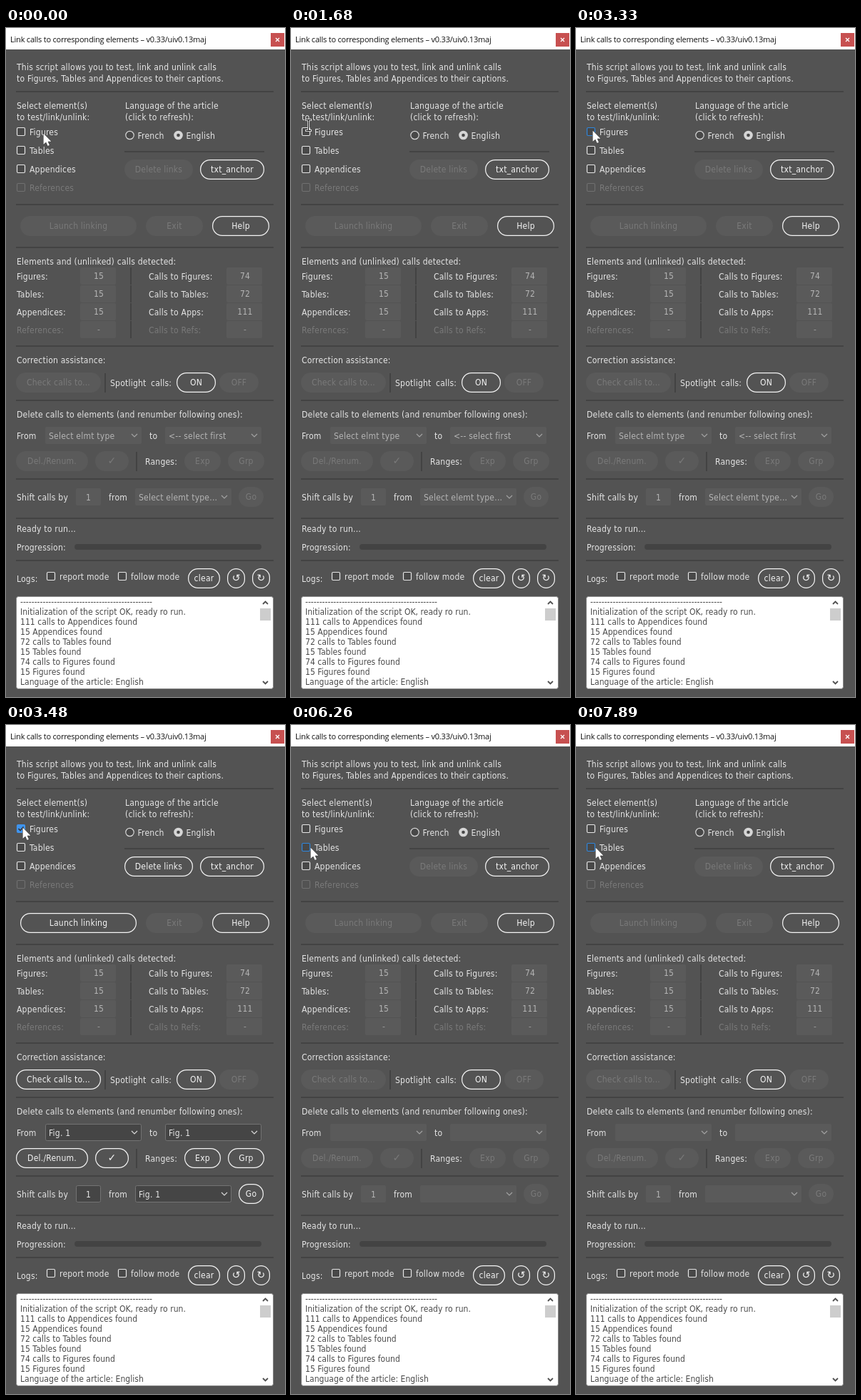
Animation, 391 px wide and 936 px high, one loop 8 s. Source, as an HTML page with a canvas:

```html
<!DOCTYPE html>
<html lang="en">
<head>
<meta charset="utf-8">
<title>Link calls</title>
<style>
html, body { margin: 0; width: 100%; height: 100%; overflow: hidden; background: #535353; }
canvas { display: block; }
</style>
</head>
<body>
<canvas id="stage" width="391" height="936"></canvas>
<script>
const ctx = document.getElementById('stage').getContext('2d');
const LOOP = 8000;
const UI = '12px "DejaVu Sans Condensed", "Noto Sans", sans-serif';
const TITLE = '11px "Open Sans", "Noto Sans", sans-serif';
const SYMBOL = '14px "DejaVu Sans", sans-serif';
const BG = '#535353', INK = '#e6e6e6', DIM = '#7a7a7a', RULE = '#434343';
const PALE = '#5a5a5a', BLUE = '#3f94ee';

// time, x, y, shape
const moves = [
  [0, 52, 147], [560, 51, 147], [1240, 50, 147], [1380, 45, 144],
  [1530, 37, 132, 'beam'], [1680, 20, 127, 'beam'], [3050, 23, 143],
  [5740, 25, 160], [5860, 27, 171]
];

// time, figures box, tables box, dropdown texts, controls enabled
const first = ['Select elmt type', '<-- select first', 'Select elemt type...'];
const blank = ['', '', ''];
const states = [
  [0, '', '', first, false],
  [3050, 'hover', '', first, false],
  [3330, 'focus', '', first, false],
  [3480, 'checked', '', Array(3).fill('Fig. 1'), true],
  [5180, 'focus', '', blank, false],
  [5860, 'focus', 'hover', blank, false],
  [6260, '', 'focus', blank, false],
  [6380, '', 'checked', Array(3).fill('Table 1'), true],
  [7890, '', 'focus', blank, false]
];

const at = (list, t) => list.filter(row => row[0] <= t).pop();

function text(str, x, y, color = INK, align = 'left', font = UI, gap = 0.23) {
  ctx.font = font;
  ctx.letterSpacing = gap + 'px';
  ctx.textAlign = align;
  ctx.fillStyle = color;
  ctx.fillText(str, x, y);
}

function rect(x, y, w, h, color) {
  ctx.fillStyle = color;
  ctx.fillRect(x, y, w, h);
}

function round(x, y, w, h, r, fill, stroke, line = 1) {
  ctx.beginPath();
  ctx.roundRect(x, y, w, h, r);
  if (fill) { ctx.fillStyle = fill; ctx.fill(); }
  if (stroke) { ctx.strokeStyle = stroke; ctx.lineWidth = line; ctx.stroke(); }
}

function path(points, color, width, close) {
  ctx.beginPath();
  points.forEach(([x, y]) => ctx.lineTo(x, y));
  if (close) ctx.closePath();
  ctx.strokeStyle = color;
  ctx.lineWidth = width;
  ctx.stroke();
}

function button(label, x, y, w, on = true, font = UI) {
  if (on) round(x + 0.6, y + 0.6, w - 1.2, 26.8, 13.4, null, '#f4f4f4', 1.2);
  else round(x, y, w, 28, 14, PALE);
  text(label, x + w / 2, y + 18, on ? '#f4f4f4' : DIM, 'center', font);
}

function check(x, y, mode) {
  const stroke = { focus: '#2f86dd', checked: BLUE, off: '#707070', hover: '#ffffff' }[mode] || INK;
  const fill = mode === 'checked' ? BLUE : mode === 'off' ? null : '#484848';
  round(x + 0.5, y + 0.5, 11, 11, 1.5, fill, stroke, 1.2);
  if (mode === 'checked') path([[x + 2.5, y + 6], [x + 5, y + 8.5], [x + 9.5, y + 3.5]], '#303030', 1.6);
}

function option(label, x, y, mode) {
  check(x, y, mode);
  text(label, x + 18, y + 11, mode === 'off' ? DIM : INK);
}

function radio(label, x, y, on) {
  ctx.beginPath();
  ctx.arc(x, y, 5.7, 0, 7);
  ctx.fillStyle = on ? '#d6d6d6' : '#484848';
  ctx.fill();
  ctx.strokeStyle = '#d6d6d6';
  ctx.lineWidth = 1.2;
  ctx.stroke();
  if (on) {
    ctx.beginPath();
    ctx.arc(x, y, 2.3, 0, 7);
    ctx.fillStyle = '#484848';
    ctx.fill();
  }
  text(label, x + 11, y + 5);
}

function field(x, y, w, on) {
  if (on) round(x + 0.5, y + 0.5, w - 1, 23, 2, '#454545', '#737373');
  else round(x, y, w, 24, 2, PALE);
}

function menu(label, x, y, w, on) {
  field(x, y, w, on);
  text(label, x + 5, y + 17, on ? INK : '#b4b4b4');
  const cx = x + w - 10, cy = y + 10;
  path([[cx - 4, cy], [cx, cy + 4], [cx + 4, cy]], on ? '#d8d8d8' : '#a2a2a2', 1.2);
}

function titleBar() {
  rect(0, 0, 391, 30, '#ffffff');
  text('Link calls to corresponding elements – v0.33/uiv0.13maj', 6, 20, '#111111', 'left', TITLE, -0.2);
  rect(371, 7, 19, 19, '#c75050');
  path([[378, 14], [383, 19]], '#ffffff', 1.3);
  path([[383, 14], [378, 19]], '#ffffff', 1.3);
}

function counts() {
  text('Elements and (unlinked) calls detected:', 15, 331);
  const rows = [
    ['Figures:', '15', 'Calls to Figures:', '74'],
    ['Tables:', '15', 'Calls to Tables:', '72'],
    ['Appendices:', '15', 'Calls to Apps:', '111'],
    ['References:', '-', 'Calls to Refs:', '-']
  ];
  rows.forEach(([a, n, b, m], i) => {
    const y = 335 + i * 25, color = i < 3 ? INK : DIM, num = i < 3 ? '#b4b4b4' : '#999999';
    field(104, y, 50, false);
    field(309, y, 50, false);
    rect(174, y, 2, 24, RULE);
    text(a, 15, y + 17, color);
    text(b, 200, y + 17, color);
    text(n, 130, y + 16, num, 'center');
    text(m, 335, y + 16, num, 'center');
  });
}

function logs() {
  text('Logs:', 15, 775);
  option('report mode', 57, 761);
  option('follow mode', 157, 761);
  button('clear', 255, 756, 45);
  button('↺', 310, 756, 25, true, SYMBOL);
  button('↻', 345, 756, 25, true, SYMBOL);
  round(14.5, 795.5, 360, 129, 3, '#ffffff', '#8a8a8a');
  ctx.save();
  ctx.beginPath();
  ctx.rect(15, 796, 340, 127);
  ctx.clip();
  const lines = ['-'.repeat(47), 'Initialization of the script OK, ready ro run.',
    '111 calls to Appendices found', '15 Appendices found', '72 calls to Tables found',
    '15 Tables found', '74 calls to Figures found', '15 Figures found',
    'Language of the article: English', 'Initialization of the script started'];
  lines.forEach((line, i) => text(line, 20, 807 + i * 14, '#4a4a4a', 'left', UI, 0.04));
  ctx.restore();
  path([[360, 806], [363.5, 802.5], [367, 806]], '#505050', 1.8);
  path([[360, 914], [363.5, 917.5], [367, 914]], '#505050', 1.8);
  rect(356, 812, 15, 17, '#cdcdcd');
}

function cursor(x, y, shape) {
  if (shape === 'beam') {
    const bars = (pad, color) => {
      rect(x + 4 - pad, y + 1 - pad, 1 + 2 * pad, 16 + 2 * pad, color);
      for (const by of [1, 16]) rect(x + 1 - pad, y + by - pad, 7 + 2 * pad, 1 + 2 * pad, color);
    };
    bars(1, '#d8d8d8');
    bars(0, '#111111');
    return;
  }
  const tip = [[0, 0], [0, 15.5], [3.6, 12.2], [6, 17.5], [8.5, 16.4], [6.2, 11.2], [11, 11.2]];
  path(tip.map(([a, b]) => [x + a + 0.5, y + b + 0.5]), '#222222', 1, true);
  ctx.fillStyle = '#ffffff';
  ctx.fill();
}

function draw(t) {
  const [, fig, tab, picks, on] = at(states, t);
  rect(0, 0, 391, 936, BG);
  titleBar();

  for (const y of [88, 246, 306, 444, 520, 630, 685, 744]) rect(14, y, 361, 2, RULE);
  rect(166, 172, 196, 2, RULE);

  text('This script allows you to test, link and unlink calls', 15, 59);
  text('to Figures, Tables and Appendices to their captions.', 15, 75);
  text('Select element(s)', 15, 113);
  text('to test/link/unlink:', 15, 129);
  text('Language of the article', 167, 113);
  text('(click to refresh):', 167, 129);
  option('Figures', 15, 139, fig);
  option('Tables', 15, 165, tab);
  option('Appendices', 15, 191);
  option('References', 15, 217, 'off');
  radio('French', 173.5, 150, false);
  radio('English', 241.5, 150, true);
  button('Delete links', 166, 184, 96, on);
  button('txt_anchor', 272, 184, 90);
  button('Launch linking', 20, 263, 163, on);
  button('Exit', 196, 263, 80, false);
  button('Help', 289, 263, 80);

  counts();

  text('Correction assistance:', 15, 469);
  button('Check calls to...', 14, 482, 119, on);
  rect(138, 483, 2, 27, RULE);
  text('Spotlight', 146, 501);
  text('calls:', 203, 501);
  button('ON', 239, 482, 55);
  button('OFF', 299, 482, 55, false);

  text('Delete calls to elements (and renumber following ones):', 15, 545);
  text('From', 15, 575);
  menu(picks[0], 55, 558, 135, on);
  text('to', 201, 575);
  menu(picks[1], 223, 558, 135, on);
  button('Del./Renum.', 14, 592, 101, on);
  button('✓', 125, 592, 47, on, SYMBOL);
  rect(182, 593, 2, 27, RULE);
  text('Ranges:', 195, 611);
  button('Exp', 250, 592, 51, on);
  button('Grp', 311, 592, 51, on);

  text('Shift calls by', 15, 661);
  field(98, 644, 35, on);
  text('1', 115.5, 661, on ? INK : '#b4b4b4', 'center');
  text('from', 144, 661);
  menu(picks[2], 181, 644, 135, on);
  button('Go', 326, 642, 35, on);

  text('Ready to run...', 15, 705);
  text('Progression:', 15, 731);
  round(96, 722, 262, 8, 4, '#434343');
  logs();

  const [, x, y, shape] = at(moves, t);
  cursor(x, y, shape);
}

const start = performance.now();
function tick() {
  draw((performance.now() - start) % LOOP);
  requestAnimationFrame(tick);
}
tick();
</script>
</body>
</html>
```
